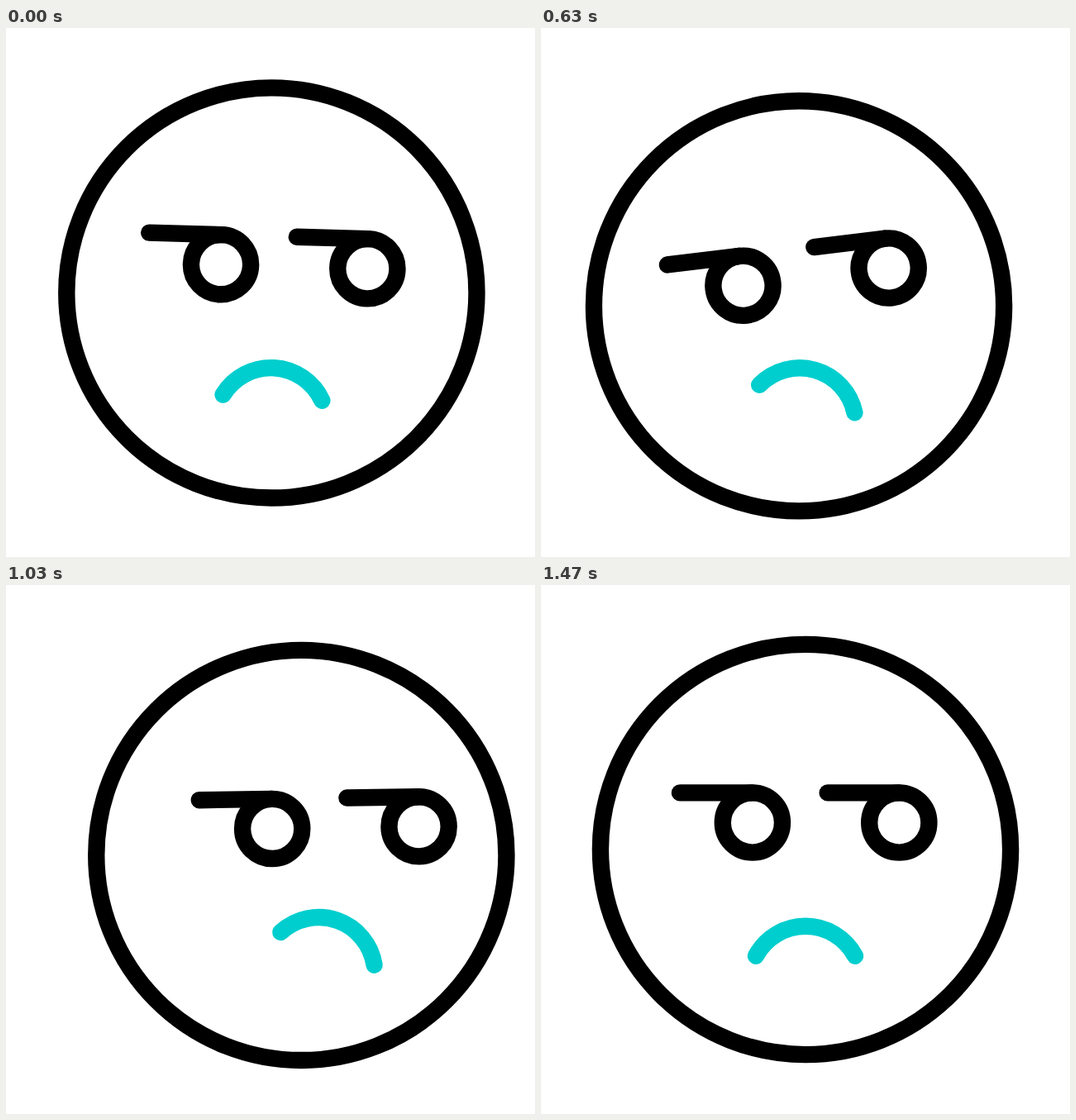
These frames come from a looping animation (640x640 px, 1.67 s). An HTML page:

```html
<!DOCTYPE html>
<html lang="en">
<head>
<meta charset="utf-8">
<title>Sulky face</title>
<style>
html, body { margin: 0; width: 100%; height: 100%; overflow: hidden; background: #fff; }
svg { display: block; width: 100%; height: 100%; }
</style>
</head>
<body>
<svg viewBox="0 0 640 640" fill="none" stroke="#000" stroke-width="20.4" stroke-linecap="round">
  <g id="head">
    <circle r="248.1"/>
    <g id="features">
      <g id="eyes">
        <circle cx="-88.7" r="36.1"/>
        <path d="M-176.6 -36.1H-88.7"/>
        <circle cx="88.7" r="36.1"/>
        <path d="M2.1 -36.1H88.7"/>
      </g>
      <path id="mouth" d="M-60 18A68 68 0 0 1 60 18" stroke="#00cece"/>
    </g>
  </g>
</svg>
<script>
const LOOP = 1670, STEP = 100 / 3, LAST = 44;

// Key poses as [step, ...values]; the face is already moving at step 0.
const head = [[-1.6, 320, 320], [13.1, 362.2, 334.4], [15.6, 362.2, 334.4],
  [21.6, 278.5, 337.6], [32.3, 360.7, 326.5], [39.3, 320, 320]];
const tilt = [[-1.6, 0], [6.8, 17.2], [21.2, -8.5], [33.4, 0]];
const gaze = [[-1.1, 0], [8.4, 48.5], [9.5, 48.5], [18.6, 0], [20.5, 0], [28, 48.5], [35, 0]];
const slide = [[-1.8, 0, 0], [7.3, 51.5, -20], [19.6, 3, -14.6], [28, 51, -20], [36.4, 0, 0]];
const twist = [[-1.7, 0], [8.2, 23.1], [28.6, 23.1], [39.4, 0]];

const ease = u => u * u * (3 - 2 * u);

// Values at step k, eased from each key pose to the next.
function at(poses, k) {
  const i = poses.findIndex(p => p[0] > k);
  if (i < 0) return poses[poses.length - 1].slice(1);
  const [t0, ...from] = poses[i - 1], [t1, ...to] = poses[i];
  const f = ease((k - t0) / (t1 - t0));
  return from.map((v, n) => v + (to[n] - v) * f);
}

function place(id, x, y, turn = 0) {
  document.getElementById(id).setAttribute("transform",
    `translate(${x.toFixed(2)} ${y.toFixed(2)}) rotate(${turn.toFixed(2)})`);
}

function draw(ms) {
  // Thirty poses a second, switched on whole hundredths of a second.
  const tick = Math.floor((ms % LOOP) / 10) * 10;
  const k = Math.min(LAST, Math.floor((tick + 5) / STEP));
  const [dx, dy] = at(slide, k);
  place("head", ...at(head, k));
  place("features", 0, 0, ...at(tilt, k));
  place("eyes", 24.6 + at(gaze, k)[0], -32.5);
  place("mouth", dx, 110.7 + dy, ...at(twist, k));
}

let start;
function loop(now) {
  start ??= now;
  draw(now - start);
  requestAnimationFrame(loop);
}
draw(0);
requestAnimationFrame(loop);
</script>
</body>
</html>
```
